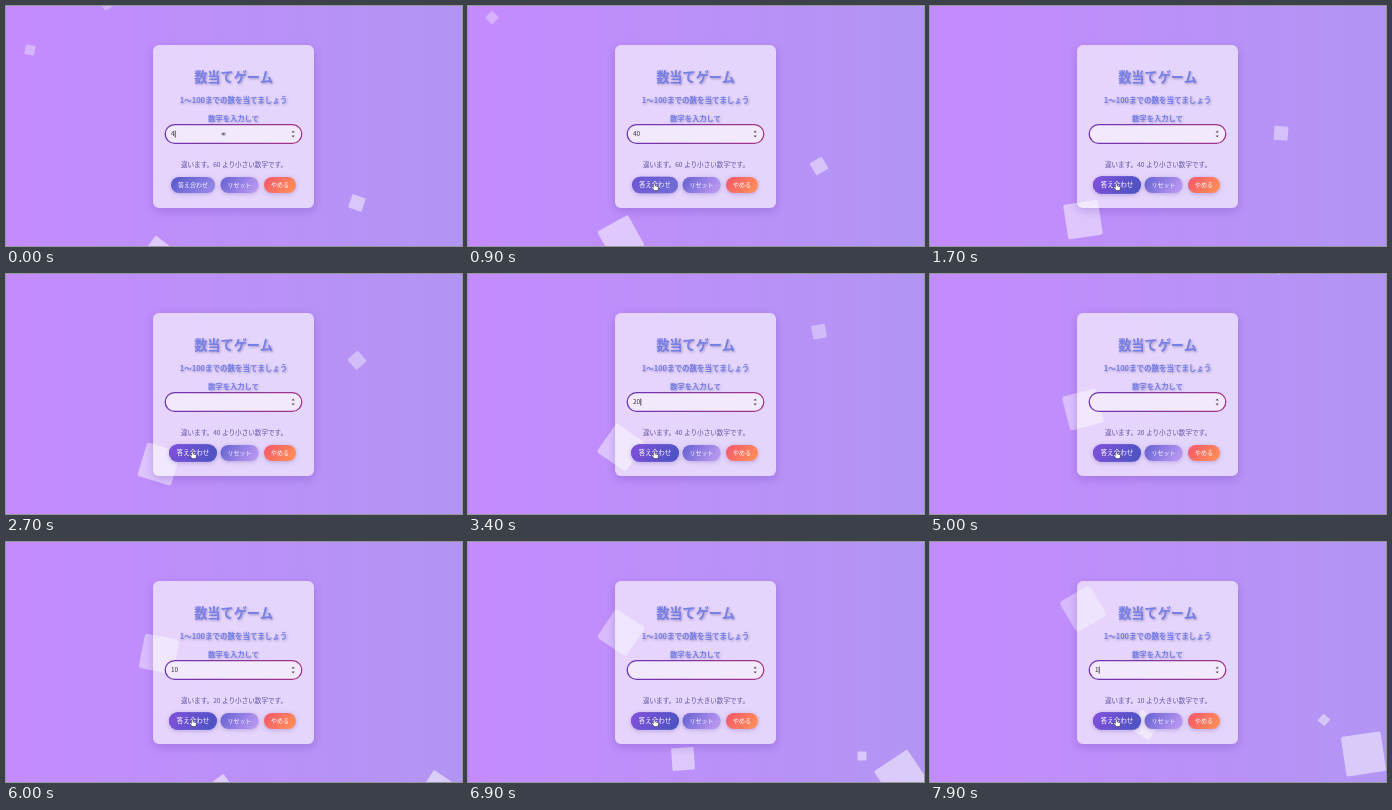
Write an HTML page that moves like this. It is 456 px wide and 240 px high and loops after 8000 ms.

```html
<!DOCTYPE html>
<html lang="ja">
<head>
<meta charset="utf-8">
<title>数当てゲーム</title>
<style>
  html, body { margin: 0; width: 100%; height: 100%; overflow: hidden; background: #bb90f9; }
  svg { display: block; width: 456px; height: 240px; }
  text { font-family: "Noto Sans CJK JP", "Noto Sans CJK", sans-serif; text-anchor: middle; }
  .head { fill: #757fe6; font-weight: 700; filter: drop-shadow(1px 1px 1px rgba(60, 40, 110, .38)); }
  .note { fill: #7d72b8; font-size: 6.6px; filter: drop-shadow(.7px .7px .6px rgba(60, 40, 110, .38)); }
  .btn { filter: drop-shadow(0 1px 2px rgba(70, 40, 140, .28)); }
  .btn text { fill: #fff; font-size: 6px; }
  #value { fill: #333; font-size: 6.4px; text-anchor: start; }
</style>
</head>
<body>
<svg viewBox="0 0 456 240">
  <defs>
    <linearGradient id="sky"><stop stop-color="#c48bff"/><stop offset="1" stop-color="#b295f3"/></linearGradient>
    <linearGradient id="rim"><stop stop-color="#6a35b5"/><stop offset="1" stop-color="#a33583"/></linearGradient>
    <linearGradient id="blue" y2=".4"><stop stop-color="#5357c8"/><stop offset="1" stop-color="#9284e6"/></linearGradient>
    <linearGradient id="hover" y2=".2"><stop stop-color="#8250dc"/><stop offset="1" stop-color="#4f53c4"/></linearGradient>
    <linearGradient id="lilac" y2=".3"><stop stop-color="#6461d0"/><stop offset="1" stop-color="#b494f0"/></linearGradient>
    <linearGradient id="warm" y2=".4"><stop stop-color="#f4556c"/><stop offset="1" stop-color="#ff8a58"/></linearGradient>
    <filter id="soft" x="-20%" y="-20%" width="140%" height="140%"><feGaussianBlur stdDeviation="5"/></filter>
    <mask id="outside"><path fill="#fff" d="M0 0H456V240H0z"/><rect x="147" y="39" width="161" height="163" rx="6"/></mask>
  </defs>
  <rect width="456" height="240" fill="url(#sky)"/>
  <g id="squares" fill="#fff"></g>

  <g mask="url(#outside)"><rect x="147" y="42" width="161" height="163" rx="6" fill="#50289a" opacity=".24" filter="url(#soft)"/></g>
  <rect x="147" y="39" width="161" height="163" rx="6" fill="#fff" opacity=".62"/>

  <text class="head" x="227.5" y="75.8" font-size="13.2">数当てゲーム</text>
  <text class="head" x="227.5" y="96.6" font-size="7.5">1〜100までの数を当てましょう</text>
  <text class="head" x="227.5" y="114.8" font-size="7.3">数字を入力して</text>

  <rect x="159.2" y="118.6" width="136.6" height="18.8" rx="9.4" fill="#f3e9fc" stroke="url(#rim)" stroke-width="1.3"/>
  <path d="M285.6 126.6l1.6-2 1.6 2zM285.6 129.4l1.6 2 1.6-2z" fill="#555"/>
  <text id="value" x="165" y="130.3"></text>
  <path id="caret" d="M169.2 124.6v7" stroke="#222" stroke-width=".8"/>
  <text id="message" class="note" x="228" y="161.4"></text>

  <g class="btn" id="check">
    <rect x="165" y="171" width="44" height="16" rx="8" fill="url(#blue)"/>
    <rect id="glow" x="165" y="171" width="44" height="16" rx="8" fill="url(#hover)"/>
    <text x="187" y="181.2">答え合わせ</text>
  </g>
  <g class="btn"><rect x="214.5" y="171" width="38" height="16" rx="8" fill="url(#lilac)"/><text x="233.5" y="181.2">リセット</text></g>
  <g class="btn"><rect x="258" y="171" width="32" height="16" rx="8" fill="url(#warm)"/><text x="274" y="181.2">やめる</text></g>

  <path id="beam" d="M-2 -.8h4M-2 .8h4M0 -.8v1.6" stroke="#443a55" stroke-width=".7"/>
  <path id="hand" d="M-1.2 -3.4q.8-.8 1.4 0l.2 2.4 2.6.7q.7.3.5 1.2l-.7 2.7h-3.6l-2.4-3.2q0-.9.9-.6l1 .6z" fill="#fff" stroke="#222" stroke-width=".5"/>
</svg>
<script>
const LOOP = 8;
const $ = id => document.getElementById(id);
const clamp = v => Math.max(0, Math.min(1, v));
const ease = v => (v = clamp(v), v * v * (3 - 2 * v));

// x, y at start, size, speed up (px/s), angle at start, turn (deg/s)
const squares = [
  [153, 254, 35, 23.7, -52, 25.5],
  [24, 44, 10, 36, 10, 39],
  [102, -6, 16, 30, -30, 32],
  [351, 197, 14, 41, 20, 44],
  [215, 451.6, 22.5, 34, -252.4, 36],
  [394, 462.4, 9, 36, -276, 40],
  [433.5, 393.7, 40, 23, -206, 25]
].map(spec => {
  const el = document.createElementNS("http://www.w3.org/2000/svg", "rect");
  $("squares").append(el);
  return { el, spec };
});

const typed = [[0, "4"], [.2, "40"], [1.1, ""], [3, "2"], [3.2, "20"], [3.6, ""],
  [5.2, "1"], [5.4, "10"], [6.3, ""], [7.8, "1"]];
const hints = [[0, "60 より小さい"], [1.1, "40 より小さい"], [3.6, "20 より小さい"], [6.3, "10 より大きい"]];
const latest = (list, t) => list.filter(e => e[0] <= t).pop();

function drawSquare({ el, spec: [x, y0, size, speed, angle, turn] }, t) {
  const y = y0 - speed * t, rise = 1 - y / 240;
  const attrs = {
    x: -size / 2, y: -size / 2, width: size, height: size,
    rx: size * Math.max(.03, .04 + .1 * rise),
    opacity: .52 - .2 * rise,
    transform: `translate(${x} ${y}) rotate(${angle + turn * t})`
  };
  for (const k in attrs) el.setAttribute(k, attrs[k]);
}

function draw(now) {
  const t = now / 1000 % LOOP;
  squares.forEach(s => drawSquare(s, t));

  const [since, value] = latest(typed, t);
  $("value").textContent = value;
  $("caret").setAttribute("visibility", value && t - since < .5 ? "visible" : "hidden");
  $("caret").setAttribute("transform", `translate(${(value.length - 1) * 3.6} 0)`);
  $("message").textContent = `違います。${latest(hints, t)[1]}数字です。`;

  const move = ease((t - .4) / .5);
  const mx = 217.5 - 30.5 * move, my = 128 + 53 * move;
  const inField = my < 138;
  $("beam").setAttribute("visibility", inField ? "visible" : "hidden");
  $("hand").setAttribute("visibility", inField ? "hidden" : "visible");
  for (const id of ["beam", "hand"]) $(id).setAttribute("transform", `translate(${mx} ${my})`);

  const hover = ease((t - .75) / .3), scale = 1 + .09 * hover;
  $("check").setAttribute("transform", `translate(187 179) scale(${scale}) translate(-187 -179)`);
  $("glow").setAttribute("opacity", hover);
  requestAnimationFrame(() => draw(performance.now() - start));
}
const start = performance.now();
draw(0);
</script>
</body>
</html>
```
